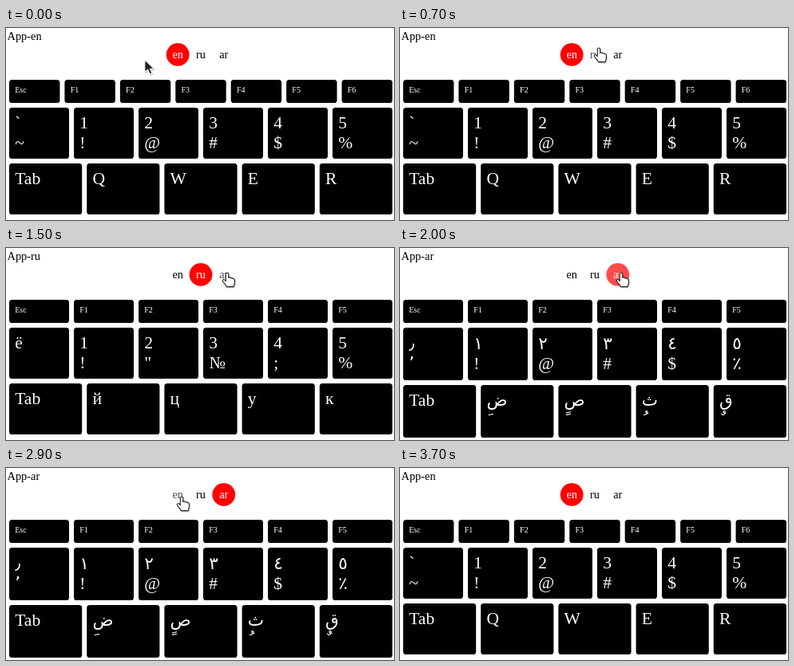
Recreate the animation shown at these times as an HTML page. Size 486x241 px, loop 4.2 s.

```html
<!DOCTYPE html>
<html lang="en">
<head>
<meta charset="utf-8">
<title>Keyboard layouts</title>
<style>
html, body { margin: 0; width: 100%; height: 100%; overflow: hidden; background: #fff; }
svg { display: block; width: 486px; height: 241px; font: 14.4px "Liberation Serif", "DejaVu Sans", serif; }
.key { fill: #fff; font-size: 21.6px; }
.small { font-size: 10.08px; }
</style>
</head>
<body>
<svg id="stage" viewBox="0 0 486 241"></svg>
<script>
const LOOP = 4200, STEP = 100, LEFT = 4, WIDTH = 480, GAP = 6;
const stage = document.getElementById('stage');

// Each key is a list of its lines.
const layouts = {
  en: {
    keys: 7, grow: 0,
    digits: ['`~', '1!', '2@', '3#', '4$', '5%'],
    letters: ['Q', 'W', 'E', 'R']
  },
  ru: {
    keys: 6, grow: 0,
    digits: ['ё', '1!', '2"', '3№', '4;', '5%'],
    letters: ['й', 'ц', 'у', 'к']
  },
  ar: {
    keys: 6, grow: 2,
    digits: ['\u066b\u066c', '\u0661!', '\u0662@', '\u0663#', '\u0664$', '\u0665\u066a'],
    letters: ['ض\u064e', 'ص\u064b', 'ث\u064f', 'ق\u064c']
  }
};
const langs = Object.keys(layouts);
const tabs = langs.map((id, i) => ({ id, x: 215.2 + 28.8 * i, y: 33.4 }));

const start = [173, 39];
const moves = [
  { at: 200, steps: 6, to: [249, 25] },
  { at: 1200, steps: 4, to: [277, 31] },
  { at: 2400, steps: 6, to: [220, 36] },
  { at: 3500, steps: 2, to: [118, 4] }
];
const LEAVE = 3700;

function add(parent, tag, attrs, text) {
  const el = document.createElementNS('http://www.w3.org/2000/svg', tag);
  for (const name in attrs) el.setAttribute(name, attrs[name]);
  if (text) el.textContent = text;
  return parent.appendChild(el);
}

function addRow(board, y, height, labels, base, cls) {
  const w = (WIDTH - GAP * (labels.length - 1)) / labels.length;
  labels.forEach((lines, i) => {
    const x = LEFT + i * (w + GAP);
    add(board, 'rect', { x, y, width: w, height, rx: 3.6 });
    lines.forEach((line, n) => {
      // A lone combining mark needs a blank to sit on.
      const text = /\p{M}/u.test(line) ? '\u00a0' + line : line;
      add(board, 'text', { x: x + 7.2, y: base + 25 * n, class: cls }, text);
    });
  });
}

function addBoard(id) {
  const { keys, grow, digits, letters } = layouts[id];
  const board = add(stage, 'g', {});
  add(board, 'text', { x: 1.5, y: 15 }, 'App-' + id);
  const top = Array.from({ length: keys }, (_, i) => [i ? 'F' + i : 'Esc']);
  addRow(board, 65, 29, top, 81, 'key small');
  addRow(board, 100, 64 + grow, digits.map(s => [...s]), 126 + grow / 2, 'key');
  addRow(board, 170 + grow, 64 + grow, [['Tab'], ...letters.map(s => [...s])], 196 + grow, 'key');
  return board;
}

function addTab(tab) {
  tab.group = add(stage, 'g', {});
  tab.disc = add(tab.group, 'circle', { cx: tab.x, cy: tab.y, r: 14.4, fill: '#f00' });
  tab.label = add(tab.group, 'text', { x: tab.x, y: 38, 'text-anchor': 'middle' }, tab.id);
}

function addCursor(d, fill, stroke) {
  const g = add(stage, 'g', { 'stroke-linejoin': 'round' });
  add(g, 'path', { d, transform: 'translate(.8 1.2)', opacity: .2, stroke: '#000', 'stroke-width': 1.5 });
  add(g, 'path', { d, fill, stroke, 'stroke-width': 1.1 });
  return g;
}

const boards = langs.map(addBoard);
tabs.forEach(addTab);
const arrow = addCursor('M.8 .8V16.6L4.6 13.2L7.2 19L10 17.8L7.5 12.2H12.5Z', '#222', '#fff');
const hand = addCursor('M-1.7 10.5V1.7a1.7 1.7 0 0 1 3.4 0V6.4C2.2 5.5 4.3 5.6 4.6 7' +
  'C5.2 6.2 7 6.4 7.2 7.8C8 7.2 9.4 7.6 9.4 9V13C9.4 15 8.2 15.6 8.2 17.6H-.6' +
  'C-.9 15.3-4.6 13-5.7 10.4C-6 8.6-4 8-3 9.2Z', '#fff', '#222');

const ease = p => p * p * p * (p * (6 * p - 15) + 10);
const show = (el, on) => el.setAttribute('display', on ? 'inline' : 'none');

function pointer(t) {
  let [x, y] = start;
  for (const { at, steps, to } of moves) {
    if (t < at) break;
    const k = Math.min(steps, Math.floor((t - at) / STEP) + 1);
    const p = ease(k / steps);
    x += (to[0] - x) * p;
    y += (to[1] - y) * p;
  }
  return [Math.round(x), Math.round(y)];
}

function draw(t) {
  const lang = t < 900 || t >= 3200 ? 'en' : t < 2000 ? 'ru' : 'ar';
  const [x, y] = pointer(t);
  const visible = t < LEAVE;
  let over = false;

  boards.forEach((board, i) => show(board, langs[i] === lang));
  for (const tab of tabs) {
    const hover = visible && Math.hypot(x - tab.x, y - tab.y) < 14.4;
    const active = tab.id === lang;
    over = over || hover;
    show(tab.disc, active);
    tab.label.setAttribute('fill', active ? '#fff' : '#000');
    tab.group.setAttribute('opacity', hover ? .7 : 1);
  }
  show(arrow, visible && !over);
  show(hand, visible && over);
  for (const el of [arrow, hand]) el.setAttribute('transform', `translate(${x} ${y})`);
}

const begin = performance.now();
function tick() {
  draw((performance.now() - begin) % LOOP);
  requestAnimationFrame(tick);
}
tick();
</script>
</body>
</html>
```
